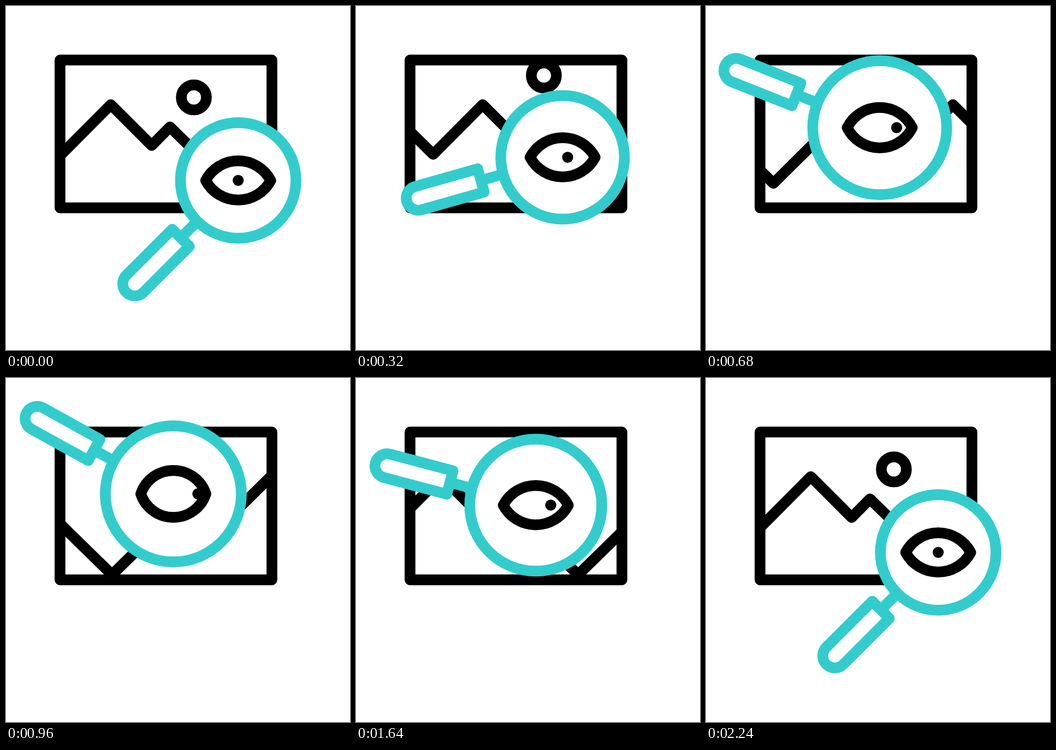
These frames come from a looping animation (640 by 640 pixels, 2.64 s). An HTML page:

```html
<!DOCTYPE html>
<html lang="en">
<head>
<meta charset="utf-8">
<title>Image search</title>
<style>
  html, body { margin: 0; height: 100%; overflow: hidden; background: #fff; }
  svg {
    display: block; width: 100vw; height: 100vh; fill: none;
    stroke-width: 20; stroke-linecap: round; stroke-linejoin: round;
  }
  .ink { stroke: #000; }
  .glass { stroke: #3cc; fill: #fff; }
</style>
</head>
<body>
<svg viewBox="0 0 640 640">
  <clipPath id="inside"><rect x="100" y="100" width="395" height="276"/></clipPath>
  <g class="ink">
    <g clip-path="url(#inside)">
      <path id="hills"/>
      <circle id="sun" cx="349.5" cy="170" r="23.3"/>
    </g>
    <rect x="100.5" y="100.5" width="394.2" height="275"/>
  </g>
  <g id="lens">
    <g id="arm" class="glass">
      <g id="handle">
        <path d="M100 0H151"/>
        <path d="M272 22.5H151V-22.5H272A22.5 22.5 0 0 1 272 22.5Z"/>
      </g>
    </g>
    <circle id="rim" class="glass"/>
    <g class="ink">
      <path id="lid"/>
      <circle id="pupil" r="10.3" fill="#000" stroke="none"/>
    </g>
  </g>
</svg>
<script>
const el = id => document.getElementById(id);
const set = (id, attrs) => {
  for (const k in attrs) el(id).setAttribute(k, attrs[k]);
};

const LOOP = 2640, MOVE = 2240, STEP = 40;
const PERIOD = 735; // width of the repeating landscape
const RIDGE = [[-139, 330], [9, 183.5], [103, 276], [195, 183.5],
               [271, 259.5], [305, 225], [449, 366], [541, 276]];
const EYE = 60.5; // half width of the eye

const clamp = x => Math.min(1, Math.max(0, x));
const smooth = x => (x = clamp(x), x * x * (3 - 2 * x));

// Cubic Bezier easing with control points (a, 0) and (b, 1)
function ease(x, a, b) {
  x = clamp(x);
  let lo = 0, hi = 1;
  for (let i = 0; i < 30; i++) {
    const u = (lo + hi) / 2, v = 1 - u;
    if (3 * a * u * v * v + 3 * b * u * u * v + u * u * u < x) lo = u;
    else hi = u;
  }
  return smooth(lo);
}

// Rises from 0 to 1 at the peak time, then falls back at the end time
const hump = (t, start, peak, end) =>
  smooth(t < peak ? (t - start) / (peak - start) : (end - t) / (end - peak));

const ridgePoints = [-PERIOD, 0].flatMap(dx => RIDGE.map(([x, y]) => [x + dx, y]));
set("hills", { d: "M" + ridgePoints.join("L") });

function draw(t) {
  const shift = PERIOD * ease(t / MOVE, .41, .207);
  set("hills", { transform: `translate(${shift})` });
  set("sun", { cy: 170 - Math.min(shift, PERIOD - shift) });

  const p = t < 1120 ? ease(t / 960, .29, .42) : 1 - ease((t - 1280) / 960, .65, .41);
  set("lens", { transform: `translate(${432 - 120.7 * p} ${324.5 - 108.9 * p})` });
  set("arm", { transform: `rotate(${135 + 74 * p})` });
  set("handle", { transform: `translate(${17.5 * p})` });
  set("rim", { r: 107.5 + 19 * p });

  const h = 36.5 + 9 * hump(t, 560, 1120, 1680);
  const r = (EYE * EYE + h * h) / (2 * h);
  const arc = `A${r} ${r} 0 0 1 `;
  set("lid", { d: `M${-EYE} 0${arc}${EYE} 0${arc}${-EYE} 0Z` });
  set("pupil", { cx: 49 * hump(t, 0, 1140, MOVE) });
}

const start = performance.now();
function tick() {
  const t = (performance.now() - start) % LOOP;
  draw(Math.min(MOVE, Math.floor(t / STEP) * STEP));
  requestAnimationFrame(tick);
}
tick();
</script>
</body>
</html>
```
